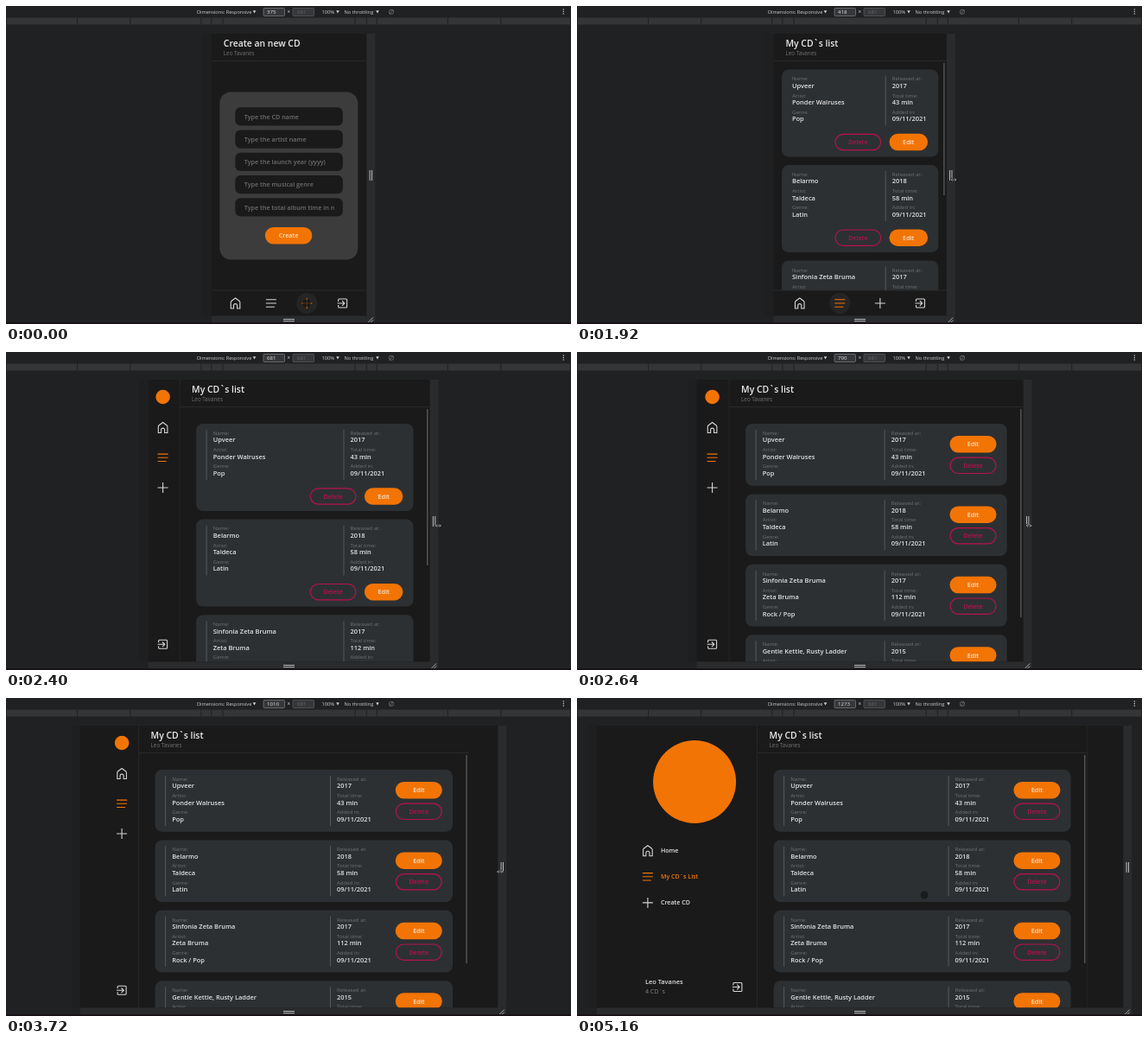
Write an HTML page with a canvas that moves like this. It is 654x368 px and loops after 5280 ms.

```html
<!DOCTYPE html>
<html lang="en">
<head>
<meta charset="utf-8">
<title>My CD list</title>
<style>
  html, body { margin: 0; width: 100%; height: 100%; overflow: hidden; background: #202122; }
  canvas { display: block; width: 654px; height: 368px; }
</style>
</head>
<body>
<canvas id="stage"></canvas>
<script>
const canvas = document.getElementById('stage');
const dpr = window.devicePixelRatio || 1;
canvas.width = 654 * dpr;
canvas.height = 368 * dpr;
const g = canvas.getContext('2d');

const LOOP = 5280, STEP = 120;
const SCALE = 0.4787, CENTER = 327.6, TOP = 32, BOTTOM = 358.5;
const DESK = '#202122', PAGE = '#1a1a1a';
const ORANGE = '#f27405', PINK = '#b8124c', WHITE = '#e2e2e2', GREY = '#707274';
const USER = 'Leo Tavanes';

// [time, value, ...] keys, linear in between
const WIDTHS = [[1800, 375], [2160, 505], [2400, 681], [2640, 790], [3000, 861],
  [3360, 861], [3960, 1109], [4200, 1207], [4560, 1273]];
const GRIP = [[1440, 7], [2160, 9], [2400, 9.8], [3000, 1.5], [3480, 1.5], [4200, 4]];
const POINTER = [[0, 348, 344], [240, 306, 344], [480, 306, 344], [1080, 412, 227], [1440, 422, 203],
  [4680, 638, 200], [5160, 402, 228]];

const CDS = [
  ['Upveer', 'Ponder Walruses', 'Pop', '2017', '43 min'],
  ['Belarmo', 'Taldeca', 'Latin', '2018', '58 min'],
  ['Sinfonia Zeta Bruma', 'Zeta Bruma', 'Rock / Pop', '2017', '112 min'],
  ['Gentle Kettle, Rusty Ladder', 'Zeta Bruma', 'Rock', '2015', '51 min'],
];
const FIELDS = ['Type the CD name', 'Type the artist name', 'Type the launch year (yyyy)',
  'Type the musical genre', 'Type the total album time in minutes'];

const ICONS = {
  home: 'M-5.3 6V-1Q-5.3-2-4.4-2.7L0-6L4.4-2.7Q5.3-2 5.3-1V6H2V2.6A2 2 0 0 0-2 2.6V6Z',
  list: 'M-6-4.2H6M-6 0H6M-6 4.2H4',
  plus: 'M-6 0H6M0-6V6',
  exit: 'M-5-2V-4Q-5-5-4-5H4Q5-5 5-4V4Q5 5 4 5H-4Q-5 5-5 4V2M-6 0H2M-.6-2.8L2.2 0L-.6 2.8',
  resize: 'M-3 0H3M-1.4-1.6L-3 0L-1.4 1.6M1.4-1.6L3 0L1.4 1.6',
};

function at(keys, t) {
  const i = keys.findIndex(k => k[0] > t);
  if (i < 0) return keys[keys.length - 1].slice(1);
  if (i === 0) return keys[0].slice(1);
  const a = keys[i - 1], b = keys[i], p = (t - a[0]) / (b[0] - a[0]);
  return a.slice(1).map((v, n) => v + (b[n + 1] - v) * p);
}

function rect(x, y, w, h, color) {
  g.fillStyle = color;
  g.fillRect(x, y, w, h);
}

function round(x, y, w, h, r, fill, stroke) {
  g.beginPath();
  g.roundRect(x, y, w, h, r);
  if (fill) { g.fillStyle = fill; g.fill(); }
  if (stroke) { g.strokeStyle = stroke; g.stroke(); }
}

function disc(x, y, r, color) {
  g.beginPath();
  g.arc(x, y, r, 0, 7);
  g.fillStyle = color;
  g.fill();
}

function text(str, x, y, size, color, weight = 600, align = 'left') {
  g.font = `${weight} ${size}px "Open Sans", "Noto Sans", sans-serif`;
  g.textAlign = align;
  g.fillStyle = color;
  g.fillText(str, x, y);
}

function icon(name, x, y, color = '#d6d6d6', width = 1.1) {
  g.save();
  g.translate(x, y);
  g.strokeStyle = color;
  g.lineWidth = width;
  g.stroke(new Path2D(ICONS[name]));
  g.restore();
}

function button(label, x, y, w, outlined) {
  g.lineWidth = 1.2;
  if (outlined) round(x + .6, y + .6, w - 1.2, 18.3, 9.2, null, PINK);
  else round(x, y, w, 19.5, 9.7, ORANGE);
  text(label, x + w / 2, y + 12.4, 7.2, outlined ? PINK : '#f8e6d2', 600, 'center');
}

function clip(x, y, w, h, draw) {
  g.save();
  g.beginPath();
  g.rect(x, y, w, h);
  g.clip();
  draw();
  g.restore();
}

function arrowDown(x) {
  g.beginPath();
  g.moveTo(x - 1.8, 5.2);
  g.lineTo(x + 1.8, 5.2);
  g.lineTo(x, 8.6);
  g.fillStyle = '#d0d0d0';
  g.fill();
}

function toolbar(width) {
  const ink = '#cfd0d2';
  text('Dimensions: Responsive', 221, 9, 5.6, ink, 400);
  text('100%', 365.5, 9, 5.7, ink, 400);
  text('No throttling', 391.5, 9, 5.7, ink, 400);
  [287.5, 384, 430].forEach(arrowDown);
  g.lineWidth = .8;
  round(298, 2.5, 24.5, 9, 1, '#36373a', '#77787a');
  text(Math.round(width), 302, 9.1, 6.1, '#e2e2e2', 400);
  text('×', 327.3, 9, 6.3, ink, 400, 'center');
  round(332, 2.5, 24.5, 9, 1, '#36373a', '#58595b');
  text('681', 337, 9.1, 6.1, '#66676a', 400);
  g.beginPath();
  g.arc(446, 6.8, 2.6, 0, 7);
  g.moveTo(443.8, 9.4);
  g.lineTo(448.2, 4.2);
  g.strokeStyle = '#77787a';
  g.stroke();
  [4, 6.5, 9].forEach(y => disc(645.3, y, .7, ink));

  // preset width bars
  rect(1, 13.5, 652, 8, '#343537');
  for (const preset of [320, 375, 425, 768, 1024]) {
    const half = preset * SCALE / 2;
    rect(CENTER - half - .5, 13.5, 1, 8, DESK);
    rect(CENTER + half - .5, 13.5, 1, 8, DESK);
  }
}

function handles(left, right) {
  const bar = '#2a2b2d', ink = '#bcbdbf';
  rect(left - 10, TOP, 10, BOTTOM - TOP, '#1e1f20');
  rect(right, TOP, 10, BOTTOM - TOP, bar);
  rect(left, BOTTOM, right - left + 10, 7.5, bar);
  rect(right + 3.3, 190, 1, 12, ink);
  rect(right + 5.7, 190, 1, 12, ink);
  rect(321, 362, 13, 1, ink);
  rect(321, 364.2, 13, 1, ink);
  g.beginPath();
  g.moveTo(right + 2, 366);
  g.lineTo(right + 7.5, 360.5);
  g.moveTo(right + 5, 366);
  g.lineTo(right + 7.5, 363.5);
  g.strokeStyle = ink;
  g.lineWidth = .9;
  g.stroke();
  rect(0, 366.5, 654, 1.5, '#170d15');
}

function header(title, x, right) {
  rect(x, 63, right - x, 1, '#292929');
  text(title, x + 14, 47.3, 10.4, '#ececec');
  text(USER, x + 14, 57.3, 6.3, GREY, 400);
}

function form(left) {
  round(left + 9.5, 99.5, 160, 194, 13, '#3c3c3c');
  FIELDS.forEach((label, i) => {
    const x = left + 27.5, y = 117.3 + i * 26.25;
    round(x, y, 124.5, 21.3, 6, PAGE);
    clip(x + 10, y, 104.5, 22, () => text(label, x + 10.5, y + 13.4, 7.2, '#6e6e6e'));
  });
  button('Create', left + 62, 256, 54.5);
}

function column(x, top, pairs) {
  pairs.forEach(([label, value], i) => {
    const y = top + i * 19.2;
    text(label, x, y + 12.8, 6.1, GREY, 400);
    text(value, x, y + 21.3, 7.45, WHITE);
  });
}

function card(cd, x, y, right, width) {
  const [name, artist, genre, year, time] = cd;
  const wide = width >= 768, narrow = width < 425;
  const second = right - (wide ? 141.5 : narrow ? 61 : 80.6);
  round(x, y, right - x, wide ? 71.7 : 101, 8, '#2d3033');
  if (!narrow) rect(x + 11.5, y + 7, 1, 58, '#55585a');
  rect(second - .5, y + 7, 1, 58, '#55585a');
  column(x + (narrow ? 12 : 19.6), y, [['Name:', name], ['Artist:', artist], ['Genre:', genre]]);
  column(second + 7.5, y, [['Released at:', year], ['Total time:', time], ['Added in:', '09/11/2021']]);
  if (wide) {
    button('Edit', right - 66.2, y + 14, 54);
    button('Delete', right - 66.2, y + 38.6, 54, true);
  } else {
    button('Edit', right - 56.7, y + 74.3, 44.5);
    button('Delete', right - 119.8, y + 74.3, 53.7, true);
  }
}

function list(left, right, width) {
  const mobile = width < 600, wide = width >= 768;
  const margin = mobile ? 9.5 : 19;
  const end = mobile ? 329 : BOTTOM;
  clip(left, 64, right - left, end - 64, () => {
    CDS.forEach((cd, i) => card(cd, left + margin, (mobile ? 73.5 : 83) + i * (wide ? 81.4 : 110.6),
      right - margin, width));
    rect(right - 3.6, 66, 1.5, (mobile ? 219 : wide ? 307 : 247) - 66, '#525354');
  });
}

function tabs(left, right, active) {
  rect(left, 328.5, right - left, 1, '#2a2a2a');
  const pitch = (right - left - 14) / 4;
  Object.keys(ICONS).slice(0, 4).forEach((name, i) => {
    const x = left + 7 + pitch * (i + .5);
    if (name === active) disc(x, 344, 12, '#252525');
    icon(name, x, 344, name === active ? ORANGE : undefined);
  });
}

function slimSidebar(x) {
  disc(x, 52, 8.3, ORANGE);
  icon('home', x, 87.5);
  icon('list', x, 122.3, ORANGE);
  icon('plus', x, 157);
  icon('exit', x, 338.3);
}

function fullSidebar(edge) {
  disc(edge - 72.5, 97, 48, ORANGE);
  [['home', 'Home'], ['list', 'My CD`s List'], ['plus', 'Create CD']].forEach(([name, label], i) => {
    const color = name === 'list' ? ORANGE : undefined, y = 176.7 + i * 30.1;
    icon(name, edge - 126.7, y, color);
    text(label, edge - 111.7, y + 2.5, 7.1, color || WHITE);
  });
  text(USER, edge - 129.7, 331, 7.45, WHITE);
  text('4 CD`s', edge - 129.7, 342, 7.1, '#808284', 400);
  icon('exit', edge - 22.7, 334.5);
}

function page(t, width, left, right) {
  rect(left, TOP, right - left, BOTTOM - TOP, PAGE);
  if (width < 600) {
    const listing = t >= 480;
    header(listing ? 'My CD`s list' : 'Create an new CD', left, right);
    if (listing) list(left, right, width);
    else form(left);
    tabs(left, right, listing ? 'list' : 'plus');
    return;
  }
  const full = width >= 1240;
  const side = Math.min(38.4, 36.5 + (width - 681) * .01);
  const mainRight = full ? CENTER + 263 : Math.min(right, CENTER + 208.4);
  const mainLeft = full ? mainRight - 382 : Math.max(left + side, CENTER - 174);
  rect(mainLeft - .5, TOP, 1, BOTTOM - TOP, '#272727');
  if (full) {
    rect(mainRight - .5, TOP, 1, BOTTOM - TOP, '#242424');
    fullSidebar(mainLeft);
  } else {
    slimSidebar(mainLeft - 19.5);
  }
  header('My CD`s list', mainLeft, mainRight);
  list(mainLeft, mainRight, width);
}

function pointer(t, right) {
  if (t >= 1440 && t < 4800) {
    const x = right + at(GRIP, t)[0];
    icon('resize', x, 201, '#151515', 2);
    icon('resize', x, 201, '#b4b4b4', .8);
  } else {
    const [x, y] = at(POINTER, t);
    disc(x, y, 4.6, 'rgba(20,20,20,.72)');
  }
}

function draw(now) {
  const t = Math.floor(now % LOOP / STEP) * STEP;
  const [width] = at(WIDTHS, t);
  const half = width * SCALE / 2, left = CENTER - half, right = CENTER + half;
  g.setTransform(dpr, 0, 0, dpr, 0, 0);
  rect(0, 0, 654, 368, DESK);
  toolbar(width);
  handles(left, right);
  clip(left, TOP, right - left, BOTTOM - TOP, () => page(t, width, left, right));
  pointer(t, right);
}

let start;
function tick(now) {
  start ??= now;
  draw(now - start);
  requestAnimationFrame(tick);
}
draw(0);
requestAnimationFrame(tick);
</script>
</body>
</html>
```
